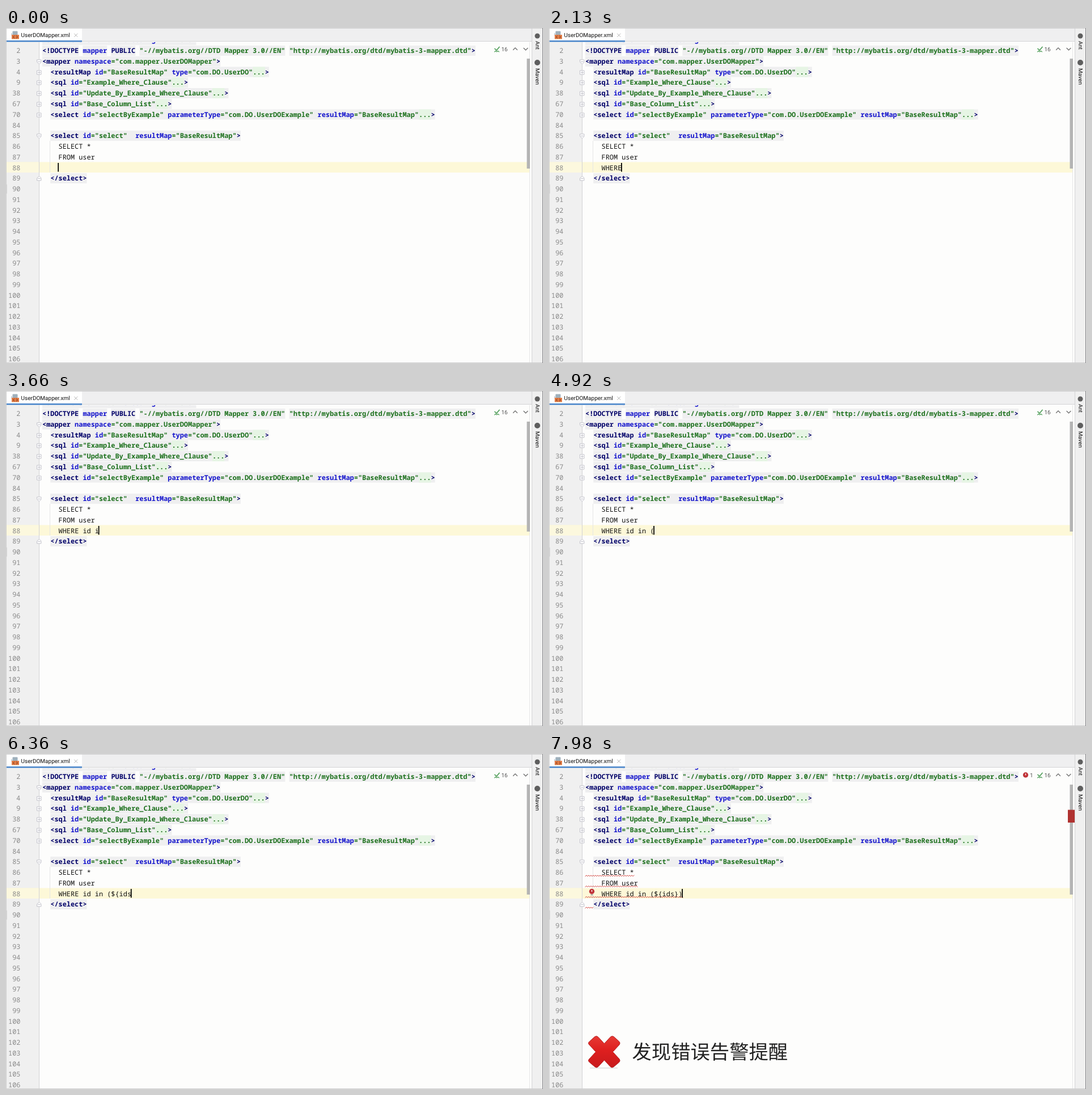
An HTML page for the animation above (8 s loop, 947 by 591 pixels).

```html
<!DOCTYPE html>
<html lang="en">
<head>
<meta charset="utf-8">
<title>Mapper editor</title>
<style>
  html, body { margin: 0; width: 100%; height: 100%; overflow: hidden; background: #fdfdfc; }
  svg { display: block; width: 947px; height: 591px; }
  text { white-space: pre; text-rendering: geometricPrecision; }
  .code text { font: 11.9px "Noto Sans Mono", "DejaVu Sans Mono", monospace; font-variant-ligatures: none; fill: #111; }
  .code .bold { font-weight: 600; }
  .code .num { fill: #8a8a8a; text-anchor: end; }
  .code .tag { fill: #000068; }
  .code .attr { fill: #1212cc; }
  .code .value { fill: #1c701c; }
  .ui { font: 10px Roboto, "Liberation Sans", sans-serif; fill: #111; }
  .side { font-size: 9.8px; }
  .count { fill: #555; }
  .banner text { font: 34.35px "Noto Sans CJK SC", "Noto Sans CJK", sans-serif; fill: #222; }
  .line { fill: none; stroke-linecap: round; stroke-linejoin: round; }
</style>
</head>
<body>
<svg viewBox="0 0 947 591">
  <defs>
    <linearGradient id="red" x1="0" y1="0" x2="0" y2="1">
      <stop offset="0" stop-color="#e63a34"/>
      <stop offset=".45" stop-color="#de1f1f"/>
      <stop offset="1" stop-color="#c81a1c"/>
    </linearGradient>
    <g id="alert">
      <circle r="4.7" fill="#c0353a"/>
      <path d="M0-2.6V.5M0 2.4v.1" stroke="#fff" stroke-width="1.4"/>
    </g>
  </defs>

  <rect width="947" height="591" fill="#fdfdfc"/>
  <rect y="25" width="58" height="566" fill="#f0f0f0"/>
  <rect y="236.5" width="924" height="18.5" fill="#fdf8d8"/>
  <rect y="236.5" width="58" height="18.5" fill="#fcf8de"/>
  <path d="M58.5 25V591" stroke="#d2d2d6"/>
  <path d="M77.5 199V255" stroke="#e6e6e6"/>
  <rect y="276" width="1.5" height="16" fill="#c4c4c0"/>

  <g class="code" id="code"></g>
  <g id="folds" class="line" stroke="#c2c2ca"></g>

  <rect width="947" height="25" fill="#fdfdfc"/>
  <rect width="947" height="24" fill="#efeff0"/>
  <path d="M0 23.5H947" stroke="#d4d4d6"/>
  <rect x="1" width="133" height="24" fill="#fff"/>
  <rect x="1" y="22" width="133" height="2.5" fill="#4582c8"/>
  <path d="M12 6h8v8h-8zM10 9v4" fill="#9fb0bc" stroke="#9fb0bc"/>
  <rect x="10" y="12" width="13" height="7.5" fill="#e07a45"/>
  <path class="line" d="M14.5 14l-2 1.8 2 1.8M18.5 14l2 1.8-2 1.8" stroke="#6b2f12"/>
  <text class="ui" x="26.6" y="16.4">UserDOMapper.xml</text>
  <path class="line" d="M120.5 10l5.5 5.5M126 10l-5.5 5.5" stroke="#b5b5b5"/>

  <rect x="927" width="20" height="591" fill="#f0f0f0"/>
  <path d="M927.5 0V591" stroke="#d2d2d4"/>
  <path d="M923.5 25V591" stroke="#e6e6e6"/>
  <rect x="918.5" y="54" width="5.5" height="194" fill="#b4b4b4"/>
  <circle cx="937" cy="14" r="4.5" fill="#5e5e5e"/>
  <circle cx="937" cy="61" r="5" fill="#5e5e5e"/>
  <text class="ui side" transform="translate(933.5 23) rotate(90)">Ant</text>
  <text class="ui side" transform="translate(933.5 71) rotate(90)">Maven</text>

  <g class="line" stroke="#4f9d58" stroke-width="1.7">
    <path d="M862 36.5l3 3 5-6"/>
    <path d="M861.5 42l2-1.5 2 1.5 2-1.5 2 1.5" stroke-width="1.2"/>
  </g>
  <text class="ui count" x="873.5" y="40.6">16</text>
  <path class="line" d="M894.5 38.5l3.5-3.5 3.5 3.5M913 35.5l3.5 3.5 3.5-3.5" stroke="#6e6e6e" stroke-width="1.3"/>

  <path d="M.5 0V591M0 590.5H947M0 .5H947" stroke="#cfcfd0"/>
  <path d="M946.5 0V591" stroke="#808084"/>

  <g id="errors">
    <g id="waves" class="line" stroke="#d2423c"></g>
    <use href="#alert" x="75.5" y="242.5"/>
    <path d="M73.5 248.5h4" stroke="#888" stroke-width="1.5"/>
    <use href="#alert" x="840.5" y="37"/>
    <text class="ui count" x="848" y="40.6">1</text>
    <rect x="915" y="98.5" width="12" height="22.5" fill="#b03230"/>
  </g>

  <g class="code"><text id="typed" x="92.6" y="250.5"></text></g>
  <rect id="caret" y="238" width="1.8" height="15.5" fill="#000"/>

  <g id="banner" class="banner">
    <path d="M72 554h49" stroke="#cfcfcf"/>
    <path d="M81 498.5Q84 496.5 87 499.5L97.5 511 108 499.5Q111 496.5 114 498.5L123.5 507Q126.5 510 124 513L112.5 525.5 124 538Q126.5 541 123.5 544L114 552Q111 554.5 108 551.5L97.5 540 87 551.5Q84 554.5 81 552L71.5 544Q68 541 71 538L82.5 525.5 71 513Q68 510 71.5 507Z" fill="url(#red)" stroke="#b51e20"/>
    <text x="146.5" y="538.3">发现错误告警提醒</text>
  </g>
</svg>

<script>
const LOOP = 8000, CHAR = 7.14, LEFT = 64, ROW = 18.76, MIDDLE = 40;
const $ = id => document.getElementById(id);
const colX = col => LEFT + col * CHAR;
const rowY = row => MIDDLE + row * ROW;

function add(parent, name, attrs, text) {
  const el = document.createElementNS('http://www.w3.org/2000/svg', name);
  for (const key in attrs) el.setAttribute(key, attrs[key]);
  if (text) el.textContent = text;
  parent.append(el);
  return el;
}

const lines = [
  '<!DOCTYPE mapper PUBLIC "-//mybatis.org//DTD Mapper 3.0//EN" "http://mybatis.org/dtd/mybatis-3-mapper.dtd">',
  '<mapper namespace="com.mapper.UserDOMapper">',
  '  <resultMap id="BaseResultMap" type="com.DO.UserDO"...>',
  '  <sql id="Example_Where_Clause"...>',
  '  <sql id="Update_By_Example_Where_Clause"...>',
  '  <sql id="Base_Column_List"...>',
  '  <select id="selectByExample" parameterType="com.DO.UserDOExample" resultMap="BaseResultMap"...>',
  '',
  '  <select id="select"  resultMap="BaseResultMap">',
  '    SELECT *',
  '    FROM user',
  '',
  '  </select>'
];
const numbers = [2, 3, 4, 9, 38, 67, 70];
for (let n = 84; n <= 106; n++) numbers.push(n);

const code = $('code');
const shade = (row, col, length, fill) => add(code, 'rect',
  { x: colX(col), y: rowY(row) - 9, width: length * CHAR, height: 18, fill });

function drawMarkup(line, row) {
  const start = line.search(/\S/);
  if (row) shade(row, start, line.length - start, '#efeff0');
  for (const match of line.matchAll(/=?"[^"]*"|\.{3}|<\/?[!?\w]+|\??>|\w+/g)) {
    const token = match[0], col = match.index;
    if (!row) shade(row, col, token.length, '#efeff0');
    if (token === '...') shade(row, col, 3, '#e6f5e4');
    const kind = /["]|\.{3}/.test(token) ? 'value' : /[<>]|PUBLIC/.test(token) ? 'tag' : 'attr';
    add(code, 'text', { x: colX(col), y: rowY(row) + 4.2, class: 'bold ' + kind }, token);
  }
}

// This line is scrolled almost fully under the tab bar
drawMarkup('<?xml version="1.0" encoding="UTF-8"?>', -1);

lines.forEach((line, row) => {
  if (line.includes('<')) drawMarkup(line, row);
  else if (line) add(code, 'text', { x: colX(4), y: rowY(row) + 4.2 }, line.trim());
});
numbers.forEach((n, row) =>
  add(code, 'text', { x: 25.5, y: rowY(row) + 4.2, class: 'num' }, String(n)));

function drawFold(row, shape, plus) {
  const move = `translate(58.5 ${Math.round(rowY(row)) + .5})`;
  add($('folds'), 'path', { d: shape, transform: move, fill: '#fff' });
  add($('folds'), 'path', { d: 'M-2 0h4' + (plus ? 'M0-2v4' : ''), transform: move });
}
const box = 'M-3.5-3.5h7v7h-7z';
const down = 'M-3.5-3.5h7v4.5l-3.5 3-3.5-3z';
const up = 'M-3.5 3.5h7v-4.5l-3.5-3-3.5 3z';
drawFold(1, down);
for (let row = 2; row <= 6; row++) drawFold(row, box, true);
drawFold(8, down);
drawFold(12, up);

function drawWave(row, columns) {
  const steps = Math.round(columns * CHAR / 2);
  let d = '';
  for (let i = 0; i <= steps; i++)
    d += `${i ? 'L' : 'M'}${LEFT + 2 * i} ${rowY(row) + 5 + (i % 2 ? 0 : 2)}`;
  add($('waves'), 'path', { d });
}
[[9, 12], [10, 13], [11, 24], [12, 2]].forEach(([row, columns]) => drawWave(row, columns));

const phrase = 'WHERE id in (${ids})';
const keyTimes = [1230, 1430, 1610, 1790, 1980, 2450, 2750, 2950, 3250, 3540,
  3800, 4200, 4700, 5300, 5580, 5850, 6050, 6250, 6620, 6880];
const ERRORS_AT = 7450, BANNER_AT = 7600;
const show = (id, on) => $(id).setAttribute('visibility', on ? 'visible' : 'hidden');

function draw(now) {
  const t = now % LOOP;
  const count = keyTimes.filter(time => time <= t).length;
  const lastKey = count ? keyTimes[count - 1] : 0;
  const text = phrase.slice(0, count);
  if ($('typed').textContent !== text) $('typed').textContent = text;
  $('caret').setAttribute('x', 91.3 + count * CHAR);
  show('caret', (t - lastKey) % 1000 < 520);
  show('errors', t >= ERRORS_AT);
  show('banner', t >= BANNER_AT);
}

const begin = performance.now();
function tick() {
  draw(performance.now() - begin);
  requestAnimationFrame(tick);
}
tick();
</script>
</body>
</html>
```
